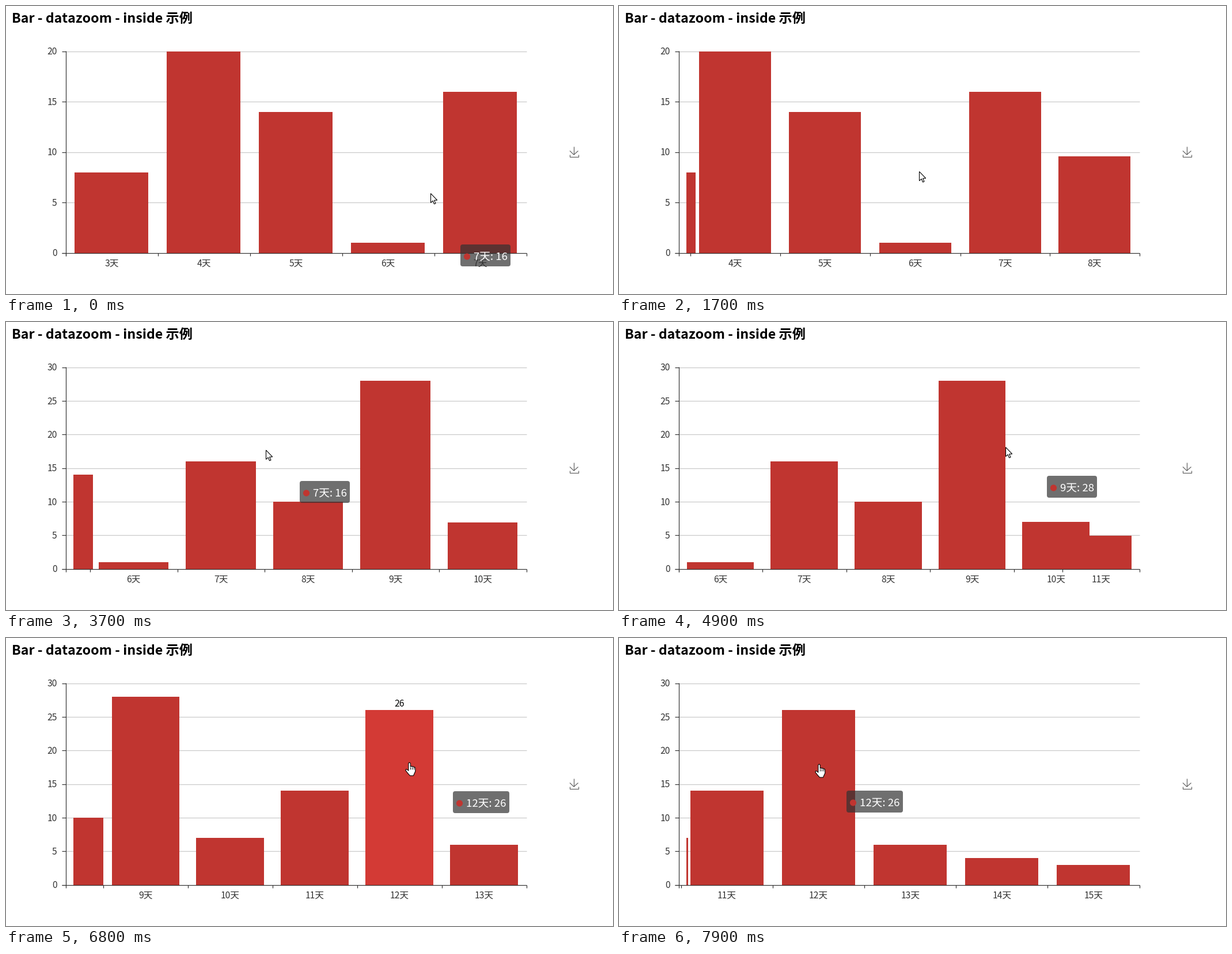
These frames come from a looping animation (1054 by 500 pixels, 8 s). A matplotlib script:

```python
import numpy as np
import matplotlib.pyplot as plt
from matplotlib.animation import FuncAnimation
from matplotlib.patches import Circle, FancyBboxPatch, Polygon, Rectangle

WIDTH, HEIGHT, DPI = 1054, 500, 100
PT = 72 / DPI
STEP, LOOP = 100, 8000
LEFT, BASE, PLOT_W, PLOT_H = 103.5, 428.5, 800, 350
RED, BRIGHT, DARK, GRID = "#c03530", "#d33a35", "#333333", "#cccccc"
FONT = "Noto Sans CJK JP"
VALUES = dict(zip(range(3, 16), [8, 20, 14, 1, 16, 10, 28, 7, 14, 26, 6, 4, 3]))

# (time, first day, last day) of each zoom window
WINDOWS = [
    (1375, 3, 8), (1560, 4, 8), (2060, 4, 9), (2300, 5, 9),
    (3320, 5, 10), (3605, 6, 10), (4832, 6, 11), (5010, 7, 11),
    (5190, 7, 12), (5367, 8, 12), (5740, 8, 13), (6737, 9, 13),
    (6990, 9, 14), (7130, 10, 14), (7370, 10, 15), (7697, 11, 15),
]
ENTERED = {}
for start, _, last in WINDOWS:
    ENTERED.setdefault(last, start)
RESCALE = ENTERED[9]

# (time, x, y) of the pointer
PATH = np.array([
    (-200, 748, 364), (0, 737, 325), (100, 715, 305), (200, 703, 297),
    (500, 703, 297), (600, 705, 295), (700, 708, 293), (800, 708, 293),
    (900, 711, 292), (1000, 711, 292), (1375, 612, 290), (1700, 521, 287),
    (2060, 450, 285), (2300, 415, 284), (2500, 430, 280), (2900, 570, 262),
    (3300, 500, 250), (3500, 469, 226), (3700, 451, 222), (3800, 446, 222),
    (4200, 660, 218), (4400, 702, 217), (4700, 702, 217), (4900, 671, 217),
    (5190, 540, 217), (5500, 463, 216), (5750, 432, 216), (5900, 432, 216),
    (6350, 715, 216), (6500, 735, 216), (6600, 735, 216), (6800, 700, 216),
    (7300, 470, 216), (7700, 354, 215), (7900, 347, 219),
])

# (start, end, day)
TOOLTIPS = [(0, 100, 7), (2900, 3850, 7), (4200, 5000, 9), (6400, 8000, 12)]
HOVERS = [(2900, 3400, 7), (4200, 4850, 9), (6400, 8000, 12)]
HIGHLIGHTS = [(4200, 4600, 9), (6400, 7500, 12)]

ARROW = [(0, 0), (0, 16), (3.7, 12.6), (6, 18.3), (8.5, 17.3), (6.1, 11.8), (11.2, 11.6)]
HAND = [
    (-1.6, 1), (0, -0.5), (1.8, 1), (1.8, 7), (3.3, 5.9), (4.8, 7), (6.2, 6.3),
    (7.6, 7.8), (9.2, 7.6), (10.3, 9.3), (10.3, 15), (8, 20), (7, 22.5),
    (1, 22.5), (-2.2, 19), (-6.5, 13.5), (-6, 11.3), (-3.6, 12), (-1.6, 14),
]


def ease(t):
    return 1 - (1 - np.clip(t, 0, 1)) ** 3


def active(spans, t):
    return next((day for start, end, day in spans if start <= t < end), None)


def pointer(t):
    return np.array([np.interp(t, PATH[:, 0], PATH[:, i]) for i in (1, 2)])


def slots(first, last):
    band = PLOT_W / (last - first + 1)
    return {day: np.array([LEFT + i * band, band])
            for i, day in enumerate(range(first, last + 1))}


def layout(t):
    """Return (left, band) of the shown days and of those shrinking away."""
    shown, leaving = slots(3, 7), {}
    for i, (start, first, last) in enumerate(WINDOWS):
        if t < start:
            break
        end = WINDOWS[i + 1][0] if i + 1 < len(WINDOWS) else LOOP
        p = ease((min(t, end) - start) / 300)
        target = slots(first, last)
        leaving = {day: (*shown[day], 1 - p) for day in shown if day not in target}
        shown = {day: shown.get(day, goal) * (1 - p) + goal * p
                 for day, goal in target.items()}
    return shown, leaving


fig = plt.figure(figsize=(WIDTH / DPI, HEIGHT / DPI), dpi=DPI, facecolor="white")
ax = fig.add_axes([0, 0, 1, 1])
ax.set(xlim=(0, WIDTH), ylim=(HEIGHT, 0))
ax.axis("off")
moving = []


def line(xs, ys, color=DARK, width=1.2, z=3):
    return ax.plot(xs, ys, color=color, lw=width * PT, zorder=z,
                   solid_capstyle="butt", solid_joinstyle="miter")[0]


def label(x, y, text, size=15.7, color=DARK, ha="center", z=4, **style):
    return ax.text(x, y, text, fontsize=size * PT, color=color, ha=ha,
                   va="baseline", family=FONT, zorder=z, **style)


def patch(shape):
    moving.append(ax.add_patch(shape))


def draw_axis(t):
    ease_in = ease((t - RESCALE) / 300)
    unit = PLOT_H / 20 * (1 - ease_in) + PLOT_H / 30 * ease_in
    for value in range(0, 21 if t < RESCALE else 31, 5):
        y = BASE - value * (unit if value <= 20 else PLOT_H / 30)
        if value:
            moving.append(line([LEFT, LEFT + PLOT_W], [y, y], GRID, 1.3, 1))
        moving.append(line([97, LEFT], [y, y]))
        moving.append(label(88.5, y + 5.8, str(value), ha="right"))
    return unit


def draw_bars(t, unit):
    shown, leaving = layout(t)
    lit = active(HIGHLIGHTS, t)

    def bar(day, left, band, shrink=1):
        scale = unit if day < 9 else PLOT_H / 30
        grown = ease((t - ENTERED.get(day, -LOOP)) / 500)
        height = VALUES[day] * scale * grown
        patch(Rectangle((left + 0.1 * band - 0.3, BASE - height), 0.8 * band * shrink, height,
                        color=BRIGHT if day == lit else RED, lw=0, zorder=2))
        return BASE - height

    for day, (left, band, shrink) in leaving.items():
        if shrink > 0:
            bar(day, left, band, shrink)
    for day, (left, band) in shown.items():
        top = bar(day, left, band)
        center = left + band / 2
        moving.append(line([left, left], [BASE, 434]))
        moving.append(label(center, 452, f"{day}天"))
        if day == lit:
            moving.append(label(center, top - 6.5, str(VALUES[day]), color="black"))


def draw_tooltip(t):
    day = active(TOOLTIPS, t)
    if day is None:
        return
    x, y = pointer(t - 200) + (41, 50)
    width = 87 if day < 10 else 98
    patch(FancyBboxPatch((x + 4, y + 4), width - 8, 30, boxstyle="round,pad=4",
                         fc=(0.196, 0.196, 0.196, 0.7), ec="none", zorder=5))
    patch(Circle((x + 11.5, y + 21), 5.6, color=RED, lw=0, zorder=6))
    moving.append(label(x + 23, y + 26, f"{day}天: {VALUES[day]}", 18.6,
                        "white", "left", 6))


def draw_pointer(t):
    spot = pointer(t) + 0.5
    hand = active(HOVERS, t) is not None
    patch(Polygon(np.array(HAND if hand else ARROW) + spot, fc="white",
                  ec="black", lw=1.1 * PT, zorder=8))
    if hand:
        x, y = spot
        for dx in (1.8, 4.8, 7.6):
            moving.append(line([x + dx] * 2, [y + 7, y + 11.5], "black", 1, 9))


def draw_static():
    label(9.5, 29, "Bar - datazoom - inside 示例", 23.2, "black", "left", weight="bold")
    line([LEFT, LEFT], [78, 434])
    line([97, LEFT + PLOT_W], [BASE, BASE])
    line([LEFT + PLOT_W] * 2, [BASE, 434])
    icon = [[(979, 251.4), (986, 258.2), (993.5, 251.5)],
            [(978.5, 257.6), (978.5, 262.4), (993.5, 262.4), (993.5, 257.6)],
            [(986, 258), (986, 244.3)]]
    for stroke in icon:
        line(*zip(*stroke), color="#666666", width=1.25)


def update(frame):
    t = frame * STEP
    while moving:
        moving.pop().remove()
    draw_bars(t, draw_axis(t))
    draw_tooltip(t)
    draw_pointer(t)
    return moving


draw_static()
animation = FuncAnimation(fig, update, frames=LOOP // STEP, interval=STEP,
                          init_func=lambda: update(0), repeat=True, repeat_delay=0)
plt.show()
```
